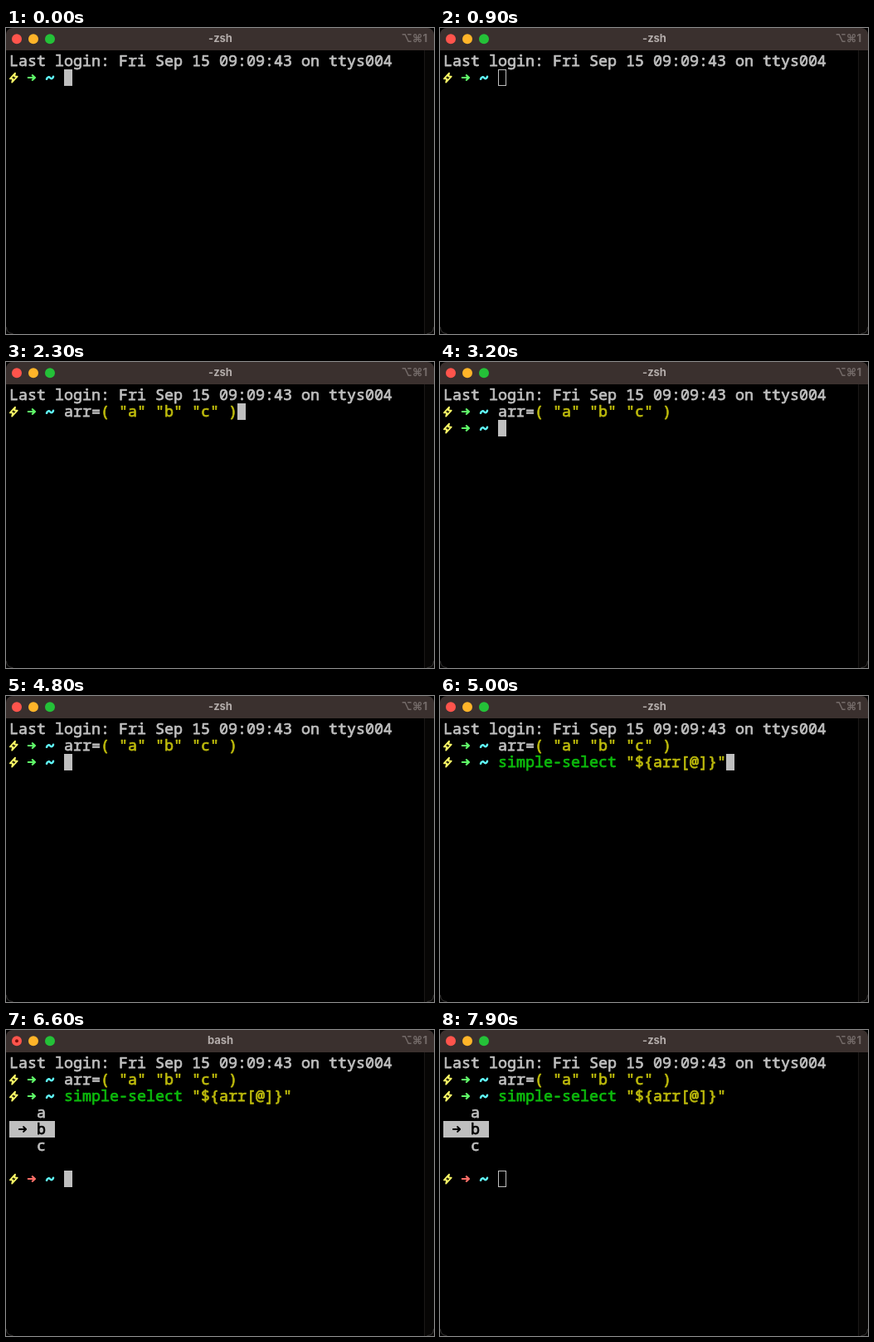
Animation of 516 by 370 pixels, one loop 8 s. Source, as an HTML page with a canvas:

```html
<!DOCTYPE html>
<html lang="en">
<head>
<meta charset="utf-8">
<title>Terminal</title>
<style>
html, body { margin: 0; width: 100%; height: 100%; overflow: hidden; background: #000; }
canvas { display: block; width: 516px; height: 370px; }
</style>
</head>
<body>
<canvas id="stage" width="516" height="370"></canvas>
<script>
const ctx = document.getElementById('stage').getContext('2d');
const LOOP = 8000, COL = 11, ROW = 20, LEFT = 4, TOP = 30;
const MONO = '18.333px "Noto Sans Mono", "DejaVu Sans Mono", monospace';
const SANS = 'bold 13px Inter, "DejaVu Sans", sans-serif';
const C = {
  text: '#bfbfbf', gold: '#bdba0c', command: '#0cba0c',
  bolt: '#fffc67', ok: '#5ffa68', fail: '#ff6e67', home: '#60fdff'
};

// Moments of the session, in ms
const T = {
  away1: 900, back1: 2100, paste1: 2200, enter1: 2700,
  away2: 3600, back2: 4800, paste2: 4900, enter2: 5300,
  busy: 5600, down: 5800, done: 6600, idle: 7000, away3: 7300
};

const colX = col => LEFT + col * COL;
const rowY = row => TOP + row * ROW;
const within = (t, a, b) => t >= a && t < b;

// The thin outline brings the regular weight up to semi-bold
function write(str, col, row, color) {
  const x = colX(col), y = rowY(row) + 16;
  ctx.font = MONO;
  ctx.textAlign = 'left';
  ctx.textBaseline = 'alphabetic';
  ctx.fillStyle = ctx.strokeStyle = color;
  ctx.lineWidth = .75;
  ctx.lineJoin = 'round';
  ctx.fillText(str, x, y);
  ctx.strokeText(str, x, y);
}

function stroke(path, x, y, color, width) {
  ctx.save();
  ctx.translate(x, y);
  ctx.strokeStyle = color;
  ctx.lineWidth = width;
  ctx.lineJoin = ctx.lineCap = 'round';
  ctx.stroke(new Path2D(path));
  ctx.restore();
}

function dot(x, y, r, color) {
  ctx.fillStyle = color;
  ctx.beginPath();
  ctx.arc(x, y, r, 0, Math.PI * 2);
  ctx.fill();
}

function prompt(row, arrow) {
  const y = rowY(row);
  stroke('M7 4.7L.9 11.3H4.3L3.2 15.6L9.7 8.7H6.1Z', LEFT, y, C.bolt, 1.8);
  stroke('M.8 10H8M5.8 7.2L9 10L5.8 12.8', colX(2), y, arrow, 2.2);
  stroke('M1 11.8C2 8.8 4 8.8 5.2 10.2C6.6 11.8 8.2 11.5 9 8.8', colX(4), y, C.home, 2.5);
}

function cursor(col, row, hollow) {
  const x = colX(col), y = rowY(row);
  if (hollow) {
    ctx.strokeStyle = C.text;
    ctx.lineWidth = 1;
    ctx.lineJoin = 'miter';
    ctx.strokeRect(x + .5, y + .5, 9, 19);
  } else {
    ctx.fillStyle = C.text;
    ctx.fillRect(x, y, 10, 20);
  }
}

function menu(row, chosen) {
  ['a', 'b', 'c'].forEach((name, i) => {
    const on = i === chosen, y = rowY(row + i);
    if (on) {
      ctx.fillStyle = C.text;
      ctx.fillRect(LEFT, y, 55, 20);
      stroke('M.8 10H9.2M6 7L9.2 10L6 13', colX(1), y, '#000', 1.8);
    }
    write(name, 3, row + i, on ? '#000' : C.text);
  });
}

function frame(t) {
  const busy = within(t, T.busy, T.idle);
  ctx.fillStyle = '#000';
  ctx.fillRect(0, 0, 516, 370);
  ctx.fillStyle = '#070605';
  ctx.fillRect(505, 27, 11, 343);
  ctx.fillStyle = '#1b1918';
  ctx.fillRect(504, 27, 1, 343);

  ctx.fillStyle = '#3a302e';
  ctx.beginPath();
  ctx.roundRect(0, 0, 516, 27, [8, 8, 0, 0]);
  ctx.fill();
  ['#ff544c', '#ffb429', '#24c138'].forEach((c, i) => dot(13 + 20 * i, 13.2, 6, c));
  if (busy) dot(13, 13.2, 2, '#7c100c');

  ctx.font = SANS;
  ctx.textBaseline = 'alphabetic';
  ctx.textAlign = 'center';
  ctx.fillStyle = '#b3acaa';
  ctx.fillText(busy ? 'bash' : '-zsh', 258.5, 17.4);
  ctx.textAlign = 'right';
  ctx.fillStyle = '#746b69';
  ctx.fillText('⌥⌘1', 508, 17);

  stroke('M.5 362Q.5 369.5 8 369.5M508 369.5Q515.5 369.5 515.5 362', 0, 0, '#3a3837', 1);
}

function draw(t) {
  frame(t);
  write('Last login: Fri Sep 15 09:09:43 on ttys004', 0, 0, C.text);

  prompt(1, C.ok);
  if (t >= T.paste1) {
    write('arr=', 6, 1, C.text);
    write('( "a" "b" "c" )', 10, 1, C.gold);
  }
  if (t < T.enter1) {
    cursor(t < T.paste1 ? 6 : 25, 1, within(t, T.away1, T.back1));
    return;
  }

  prompt(2, C.ok);
  if (t >= T.paste2) {
    write('simple-select', 6, 2, C.command);
    write('"${arr[@]}"', 20, 2, C.gold);
  }
  if (t < T.enter2) {
    cursor(t < T.paste2 ? 6 : 31, 2, within(t, T.away2, T.back2));
    return;
  }

  menu(3, t < T.down ? 0 : 1);
  if (t >= T.done) {
    prompt(7, C.fail);
    cursor(6, 7, t >= T.away3);
  }
}

const start = performance.now();
function tick() {
  draw((performance.now() - start) % LOOP);
  requestAnimationFrame(tick);
}
tick();
</script>
</body>
</html>
```
